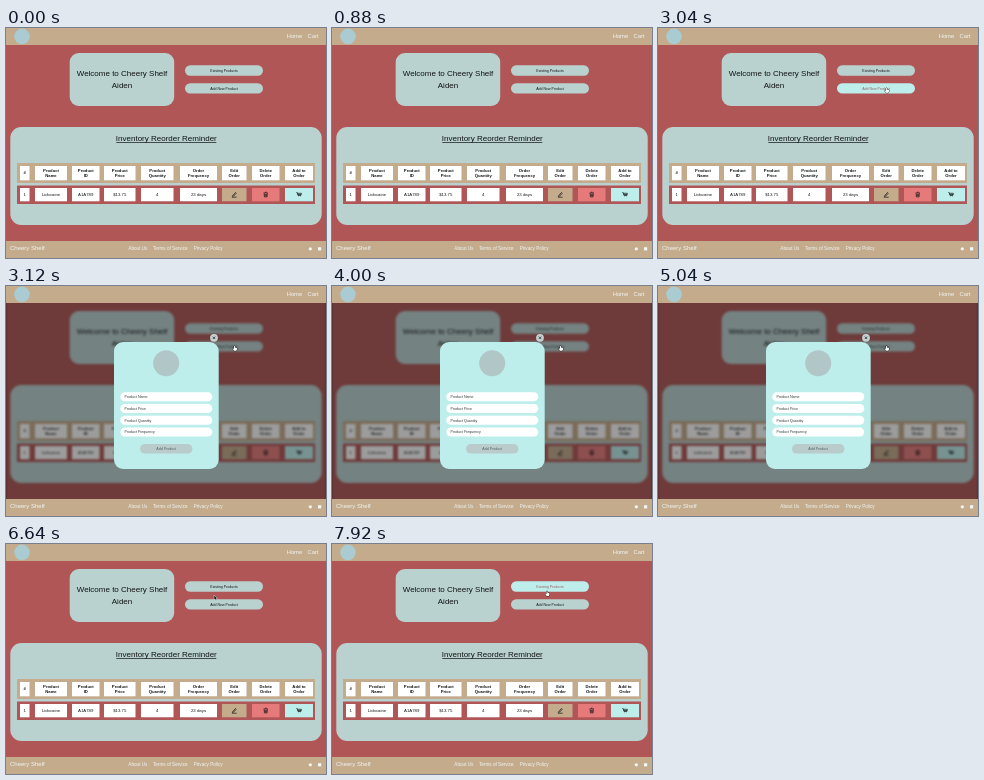
Animation of 320 by 230 pixels, one loop 8000 ms. Source, as an HTML page with a canvas:

```html
<!DOCTYPE html>
<html lang="en">
<head>
<meta charset="utf-8">
<title>Inventory</title>
<style>
html, body { margin: 0; width: 100%; height: 100%; overflow: hidden; background: #b05656; }
canvas { display: block; width: 320px; height: 230px; }
</style>
</head>
<body>
<canvas id="stage"></canvas>
<script>
const W = 320, H = 230, LOOP = 8000;
const OPEN = 3100, CLOSE = 6640;
const TAN = '#c4ab8c', RED = '#b05656', PALE = '#b9d2d0', AQUA = '#bdeeeb', INK = '#101414', WHITE = '#fff';
const BRAND = 'Cheery Shelf', USER = 'Aiden';

const scale = Math.max(1, window.devicePixelRatio || 1);
const stage = document.getElementById('stage');
const layer = document.createElement('canvas');
for (const c of [stage, layer]) {
  c.width = Math.round(W * scale);
  c.height = Math.round(H * scale);
}
const main = stage.getContext('2d');
const back = layer.getContext('2d');
let g = main;

function box(x, y, w, h, r, fill) {
  g.fillStyle = fill;
  g.beginPath();
  g.roundRect(x, y, w, h, r);
  g.fill();
}

function disc(x, y, r, fill) {
  g.fillStyle = fill;
  g.beginPath();
  g.arc(x, y, r, 0, Math.PI * 2);
  g.fill();
}

function text(s, x, y, size, color = INK, align = 'center', weight = '') {
  g.font = `${weight} ${size}px "Liberation Sans", Arial, sans-serif`;
  g.fillStyle = color;
  g.textAlign = align;
  g.textBaseline = 'middle';
  g.fillText(s, x, y);
}

function stroke(d, color, width) {
  g.strokeStyle = color;
  g.lineWidth = width;
  g.stroke(new Path2D(d));
}

const buttons = [
  { label: 'Existing Products', x: 179, y: 37.3, w: 78, h: 10.4 },
  { label: 'Add New Product', x: 179, y: 55.2, w: 78, h: 10.4 }
];

// left edge, width, heading lines, row value, row fill
const columns = [
  [14, 9.5, ['#'], '1', WHITE],
  [29, 32, ['Product', 'Name'], 'Lidocaine', WHITE],
  [66, 27.5, ['Product', 'ID'], 'A1A789', WHITE],
  [98, 31.5, ['Product', 'Price'], '$13.75', WHITE],
  [135, 32.5, ['Product', 'Quantity'], '4', WHITE],
  [174, 37, ['Order', 'Frequency'], '23 days', WHITE],
  [216, 24.5, ['Edit', 'Order'], 'pencil', TAN],
  [246, 27.5, ['Delete', 'Order'], 'bin', '#e67a7a'],
  [279, 28, ['Add to', 'Order'], 'cart', AQUA]
];

const icons = {
  pencil: 'M-1.6 1.2 L1.2 -2 L2 -1.2 L-.8 1.7 L-1.8 1.9 Z M-2.4 2.7 H2.4',
  bin: 'M-2.2 -1.6 H2.2 M-.7 -2.3 H.7 M-1.6 -1.2 L-1.3 2.4 H1.3 L1.6 -1.2 M-.5 -.5 V1.7 M.5 -.5 V1.7',
  cart: 'M-2.6 -2 H-1.8 L-1 1 H1.9 L2.4 -1.2 H-1.6 M-1.3 0 H2.1 M-.8 2.2 H-.5 M1.5 2.2 H1.8'
};

function drawIcon(name, x, y) {
  g.save();
  g.translate(x, y);
  stroke(icons[name], INK, 0.7);
  g.restore();
}

function drawTable() {
  box(11, 135, 298, 20, 0, TAN);
  box(11, 157.5, 298, 18.5, 0, RED);
  for (const [x, w, head, value, fill] of columns) {
    const mid = x + w / 2;
    box(x, 138, w, 14.3, 0, WHITE);
    head.forEach((line, i) =>
      text(line, mid, 145.2 + (i - (head.length - 1) / 2) * 4.9, 4.2, INK, 'center', 'bold'));
    box(x, 160, w, 13.3, 0, fill);
    if (icons[value]) drawIcon(value, mid, 166.5);
    else text(value, mid, 166.8, 4.3);
  }
}

function drawPage(pointer) {
  g.fillStyle = RED;
  g.fillRect(0, 0, W, H);
  box(63.7, 25, 104.5, 53, 9, PALE);
  text(`Welcome to ${BRAND}`, 116, 45.8, 8);
  text(USER, 116, 57.6, 8);
  for (const b of buttons) {
    const hot = pointer && inside(pointer, b);
    box(b.x, b.y, b.w, b.h, 5.2, hot ? AQUA : PALE);
    text(b.label, b.x + b.w / 2, b.y + b.h / 2 + 0.2, 3.55, hot ? '#96605f' : INK);
  }
  box(4.3, 99, 311.4, 98, 11, PALE);
  text('Inventory Reorder Reminder', 160.3, 110.6, 8);
  g.fillRect(110.3, 114.2, 100, 0.7);
  drawTable();
}

function drawBars() {
  g.fillStyle = TAN;
  g.fillRect(0, 0, W, 17);
  g.fillRect(0, 213, W, 17);
  const light = '#f1f7f5';
  disc(16, 8.4, 7.8, '#a9cbd1');
  text('Home', 280.7, 8.3, 5.8, light, 'left');
  text('Cart', 301.5, 8.3, 5.8, light, 'left');
  text(BRAND, 4, 220.6, 6, light, 'left');
  text('About Us', 122.3, 220.6, 4.65, light, 'left');
  text('Terms of Service', 147, 220.6, 4.65, light, 'left');
  text('Privacy Policy', 187.7, 220.6, 4.65, light, 'left');
  disc(304.3, 220.8, 1.6, light);
  box(312, 219.2, 3.2, 3.2, 0, light);
}

function drawModal(pointer) {
  box(108, 56, 104.7, 127, 9, AQUA);
  disc(160.2, 77.2, 13, '#b1c6c7');
  ['Name', 'Price', 'Quantity', 'Frequency'].forEach((field, i) => {
    const y = 106.2 + i * 11.8;
    box(114.3, y, 92, 9, 4.5, WHITE);
    text(`Product ${field}`, 118.5, y + 4.7, 3.6, '#303636', 'left');
  });
  box(134, 158, 52.5, 9.6, 4.8, '#b9cccb');
  text('Add Product', 160.2, 163, 3.6, '#566060');
  const hot = Math.hypot(pointer.x - 208, pointer.y - 51.8) < 4.2;
  disc(208, 51.8, 3.9, hot ? '#cf4f4f' : '#c3d1d0');
  stroke('M206.8 50.6 L209.2 53 M209.2 50.6 L206.8 53', INK, 0.7);
}

// time, x, y of the cursor tip
const route = [
  [1600, 322, 95], [1680, 318, 92.5], [2080, 280, 76], [2400, 238, 63],
  [2640, 228.5, 60], [5280, 228.5, 60], [5840, 208.3, 51.5],
  [7720, 208.3, 51.5], [7880, 215, 47.2], [8000, 215, 47.2]
];

function cursorAt(t) {
  if (t < route[0][0]) return null;
  const i = route.findIndex(p => p[0] > t);
  const [t0, x0, y0] = route[i - 1], [t1, x1, y1] = route[i];
  const k = (t - t0) / (t1 - t0);
  return { x: x0 + (x1 - x0) * k, y: y0 + (y1 - y0) * k };
}

function inside(p, b) {
  return p.x >= b.x && p.x <= b.x + b.w && p.y >= b.y && p.y <= b.y + b.h;
}

function drawCursor(p, hand) {
  const shape = new Path2D(hand
    ? 'M-.4 0 L.4 0 L.5 1.6 L2.4 2 L2.5 3.3 L1.8 4.8 H-.4 L-1.8 2.8 L-1.3 2.3 L-.5 2.9 Z'
    : 'M0 0 V4 L.9 3.2 L1.6 4.7 L2.2 4.4 L1.6 3 H2.8 Z');
  g.save();
  g.translate(p.x, p.y);
  g.lineJoin = 'round';
  g.lineWidth = 0.8;
  g.strokeStyle = hand ? INK : WHITE;
  g.stroke(shape);
  g.fillStyle = hand ? WHITE : INK;
  g.fill(shape);
  g.restore();
}

// The blurred backdrop never changes, so it is painted once.
function paintBackdrop() {
  g = back;
  g.setTransform(scale, 0, 0, scale, 0, 0);
  drawPage(null);
  g = main;
}

function render(t) {
  const p = cursorAt(t);
  const open = t >= OPEN && t < CLOSE;
  g.setTransform(scale, 0, 0, scale, 0, 0);
  if (open) {
    g.filter = `blur(${scale}px)`;
    g.drawImage(layer, 0, 0, W, H);
    g.filter = 'none';
    g.fillStyle = 'rgba(20,20,20,.42)';
    g.fillRect(0, 0, W, H);
  } else {
    drawPage(p);
  }
  drawBars();
  if (open) drawModal(p);
  if (p) drawCursor(p, open || buttons.some(b => inside(p, b)));
}

paintBackdrop();
const start = performance.now();
function tick() {
  render((performance.now() - start) % LOOP);
  requestAnimationFrame(tick);
}
tick();
</script>
</body>
</html>
```
